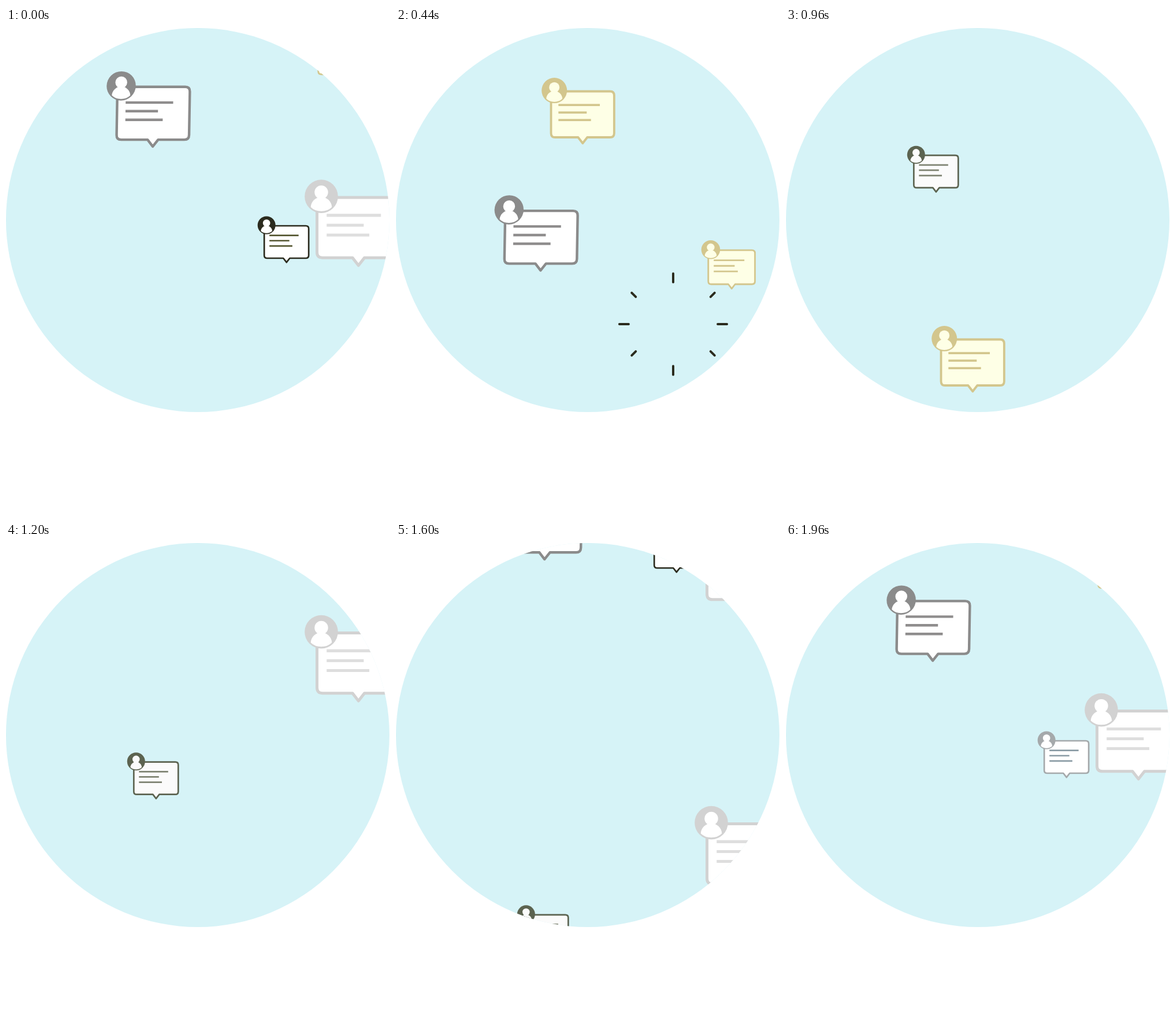
These frames come from a looping animation (665x842 px, 2000 ms). An HTML page with a canvas:

```html
<!DOCTYPE html>
<html>
<head>
<meta charset="utf-8">
<title>Falling messages</title>
<style>
  html, body { margin: 0; width: 100%; height: 100%; overflow: hidden; background: #fff; }
  canvas { display: block; }
</style>
</head>
<body>
<canvas id="stage" width="665" height="842"></canvas>
<script>
const ctx = document.getElementById('stage').getContext('2d');
const LOOP = 2000, STEP = 40;
const PERIOD = 1963;   // the motion repeats slightly sooner than the loop
const SKEW = -0.0175;

const theme = (edge, text, fill) => ({ edge, text, fill });
const pale = theme('#d2d2d2', '#dedede', '#fff');
const grey = theme('#8b8b8b', '#8f8d8d', '#fff');
const sand = theme('#d3c68d', '#d3c68d', '#feffe6');
const moss = theme('#5c6350', '#7f8473', '#fbfbfb');
const ink = theme('#2b2b1e', '#565833', '#fff');
const ash = theme('#a5a9ab', '#8b9ca5', '#fff');

// y is the top of the box at time 0, v is in pixels per ms
const fallers = [
  { x: 538.6, y: 293, v: 0.825, size: 1.86, look: pale },
  { x: 538.6, y: -834.5, v: 0.825, size: 1.86, look: pale },
  { x: 540.8, y: 21.2, v: 0.825, size: 1.05, look: sand },
  { x: 268.5, y: -253.5, v: 0.825, size: 1.42, look: sand },
  { x: 193, y: 101.8, v: 0.487, size: 1.63, look: grey, skew: SKEW, end: 540 },
  { x: 221.3, y: -413.8, v: 0.6604, size: 1, look: moss, end: 1655 }
];

const bursts = [
  { x: 480, y: 512, start: 295, size: 1, color: '#2b2b1e' },
  { x: 240, y: 423, start: 498, size: 1.18, color: '#4a4a4a', skew: SKEW },
  { x: 254.5, y: 731.3, start: 1652, size: 1, color: '#2b2b1e' }
];

function line(x1, y1, x2, y2) {
  ctx.beginPath();
  ctx.moveTo(x1, y1);
  ctx.lineTo(x2, y2);
  ctx.stroke();
}

function disc(x, y, r, color) {
  ctx.fillStyle = color;
  ctx.beginPath();
  ctx.arc(x, y, r, 0, 7);
  ctx.fill();
}

function avatar(look) {
  disc(4, -1, 15.5, look.edge);
  disc(4, -4.8, 6.3, look.fill);
  ctx.fill(new Path2D('M-5.8 9C-5.8 4-1-.5 4-.5S13.8 4 13.8 9Q10 12.8 4 12.8T-5.8 9Z'));
}

const boxPath = new Path2D('M5 0H72Q77 0 77 5V51Q77 56 72 56H44.2L38.6 63.2L33 56H5Q0 56 0 51V5Q0 0 5 0Z');

function bubble(x, y, size, look, skew = 0) {
  if (y < -80 * size || y > 700) return;
  ctx.save();
  ctx.transform(size, 0, skew * size, size, x, y);
  ctx.fillStyle = look.fill;
  ctx.strokeStyle = look.edge;
  ctx.lineWidth = 2.7;
  ctx.lineCap = 'butt';
  ctx.lineJoin = 'round';
  ctx.fill(boxPath);
  ctx.stroke(boxPath);
  ctx.strokeStyle = look.text;
  [59.5, 43.5, 48.7].forEach((end, i) => {
    const row = 16.6 + i * 9.15;
    line(9, row, end, row);
  });
  avatar(look);
  ctx.restore();
}

function blinker(t) {
  if (t > 295) return;
  const y = t < -10 ? 342 + (t + 10) * 1.005 : 342 + Math.max(0, t) * 0.529;
  const dark = t < -10 || (t >= 0 && t < 30);
  bubble(447.2, y, 1, dark ? ink : ash);
}

function burst({ x, y, start, size, color, skew = 0 }, t) {
  const u = (t - start) / 188;
  if (u <= 0 || u > 1) return;
  ctx.save();
  ctx.transform(size, skew / 2 * size, skew / 2 * size, size, x, y);
  ctx.strokeStyle = color;
  ctx.lineWidth = 4 / size;
  ctx.lineCap = 'round';
  for (const s of [-1, 1]) {
    line(s * 100 * u, 0, s * (100 * u + 16), 0);
    line(0, s * 94 * u, 0, s * (94 * u + 15));
    for (const k of [-1, 1]) {
      const dx = 84 * u, dy = 61 * u;
      line(s * dx, k * dy, s * (dx + 7), k * (dy + 7));
    }
  }
  ctx.restore();
}

function draw(t) {
  ctx.clearRect(0, 0, 665, 842);
  ctx.save();
  disc(332, 332, 332, '#d6f3f7');
  ctx.clip();
  for (const time of [t, t - PERIOD]) {
    for (const { x, y, v, size, look, skew = 0, end = LOOP } of fallers) {
      if (time < end) bubble(x + skew * v * time, y + v * time, size, look, skew);
    }
  }
  blinker(t > 1000 ? t - PERIOD : t);
  ctx.restore();
  bursts.forEach(b => burst(b, t));
}

function tick(now) {
  draw(Math.floor((now + 4) % LOOP / STEP) * STEP);
  requestAnimationFrame(tick);
}
draw(0);
requestAnimationFrame(tick);
</script>
</body>
</html>
```
